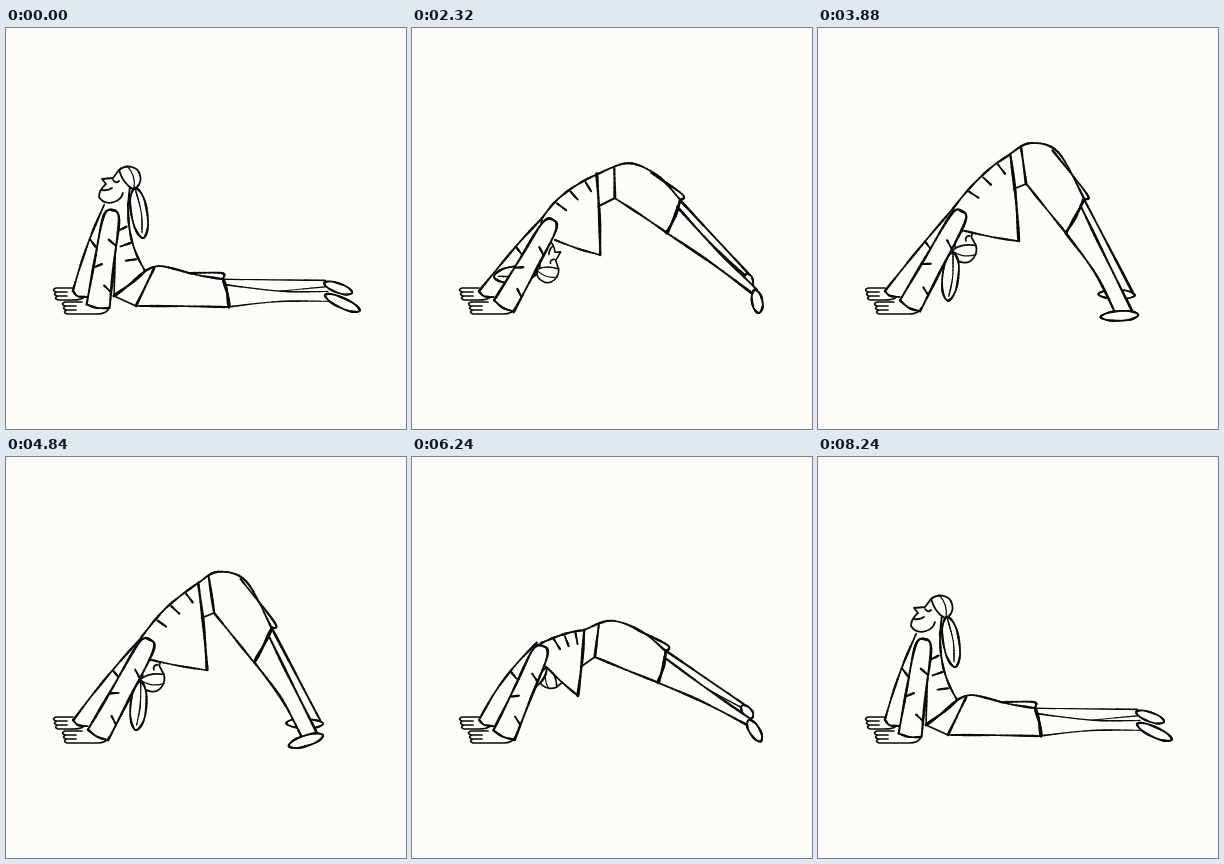
These frames come from a looping animation (400x401 px, 8320 ms). An HTML page with a canvas:

```html
<!DOCTYPE html>
<html lang="en">
<head>
<meta charset="utf-8">
<title>Yoga flow</title>
<style>
  html, body { margin: 0; width: 100%; height: 100%; overflow: hidden; background: #fdfcf8; }
  canvas { display: block; width: 400px; height: 401px; }
</style>
</head>
<body>
<canvas id="stage"></canvas>
<script>
const LOOP = 8320, PAPER = '#fdfcf8', INK = '#0b0b0b';
const FAR_WRIST = [67, 263], NEAR_WRIST = [92, 278];

// Joints of each pose; plain numbers are bends, widths and angles
const cobra = {
  shoulder: [105, 190], farShoulder: [98, 177], nape: [122, 177], armBow: 2, backBow: 5,
  hemTop: [139, 243], hemBottom: [108, 268], rump: [155, 238], seat: [190, 247],
  hemBack: [217, 251], hemFront: [223, 279], lap: 1, crotch: [130, 278],
  knee: [275, 263], heel: [319, 267], toe: [354, 283], farHeel: [318, 255], farToe: [346, 265],
  sole: 0.1, ankle: 5, legInk: 1.4,
  head: [124, 150], turn: 0, size: 1, ponyTip: [137, 210]
};
const lookUp = {
  ...cobra, farShoulder: [112, 173], nape: [127, 177], armBow: 13,
  head: [141, 156], turn: 12, ponyTip: [150, 213]
};
const rise = {
  shoulder: [137, 199], farShoulder: [130, 190], nape: [130, 190], armBow: 1, backBow: -5,
  hemTop: [185, 146], hemBottom: [188, 227], rump: [216, 135], seat: [245, 147],
  hemBack: [268, 172], hemFront: [255, 205], lap: 0.4, crotch: [203, 170],
  knee: [303, 220], heel: [343, 262], toe: [347, 285], farHeel: [335, 246], farToe: [338, 260],
  sole: 0.1, ankle: 3, legInk: 2.3,
  head: [135, 245], turn: -235, size: 0.9, ponyTip: [82, 249]
};
const dog = {
  ...rise, shoulder: [140, 190], farShoulder: [135, 181], nape: [135, 181], backBow: -4,
  hemTop: [192, 126], hemBottom: [201, 213], rump: [212, 115], seat: [240, 124],
  hemBack: [266, 171], hemFront: [248, 205], crotch: [208, 156],
  knee: [283, 220], heel: [321, 288], toe: [283, 289], farHeel: [317, 267], farToe: [280, 266],
  sole: 0.35, ankle: 8, head: [146, 224], turn: -245, size: 1, ponyTip: [130, 273]
};
const stepOut = {
  ...dog, shoulder: [134, 198], farShoulder: [122, 193], nape: [122, 193], backBow: -2,
  hemTop: [188, 122], hemBottom: [191, 231], rump: [206, 115], seat: [236, 122],
  hemBack: [270, 168], hemFront: [241, 211], crotch: [204, 150],
  knee: [268, 214], heel: [323, 262], toe: [292, 270], farHeel: [338, 243], farToe: [339, 265],
  sole: 0.2, ankle: 6, legInk: 1.8, head: [147, 226], ponyTip: [127, 271]
};

// The feet wait on the spot while the hips go up
const OPENING = [[cobra, 0], [lookUp, 1080], [lookUp, 1560], [rise, 2320]];
const CLOSING = [[dog, 3280], [dog, 5160], [stepOut, 5680], [rise, 6040],
  [lookUp, 6760], [lookUp, 7000], [cobra, 8240], [cobra, LOOP]];
const BODY = [...OPENING, [stepOut, 2480], ...CLOSING];
const LEGS = [...OPENING, [rise, 2560], [stepOut, 2840], ...CLOSING];
const LEG_JOINTS = ['knee', 'heel', 'toe', 'farHeel', 'farToe', 'sole', 'ankle'];

// Each run of drawings: first change, last change, number of changes
const RUNS = [
  [120, 840, 7], [960, 1520, 6], [1680, 2480, 11], [2560, 3320, 10], [3440, 4240, 8],
  [4360, 5160, 8], [5240, 6040, 11], [6160, 6720, 8], [6880, 7680, 8], [7800, 8240, 5]
];
const TICKS = [0, ...RUNS.flatMap(([from, to, n]) =>
  Array.from({ length: n }, (_, i) => Math.round((from + (to - from) * i / (n - 1)) / 40) * 40))];

const lerp = (a, b, u) => Array.isArray(a) ? a.map((v, i) => v + (b[i] - v) * u) : a + (b - a) * u;
const move = (p, dir, by) => p.map((v, i) => v + dir[i] * by);
const unit = (a, b) => {
  const [x, y] = [b[0] - a[0], b[1] - a[1]], d = Math.hypot(x, y) || 1;
  return [x / d, y / d];
};
const normal = (a, b) => { const [x, y] = unit(a, b); return [-y, x]; };
const bent = (a, b, u, bow) => move(lerp(a, b, u), normal(a, b), bow * 4 * u * (1 - u));

let seed = 0;
function random() {
  const x = Math.sin(++seed * 12.9898) * 43758.5453;
  return x - Math.floor(x);
}

function sample(keys, t) {
  const k = Math.max(0, keys.findIndex(key => key[1] > t) - 1);
  const [a, t0] = keys[k], [b, t1] = keys[k + 1], pose = {};
  for (const name in a) pose[name] = lerp(a[name], b[name], (t - t0) / (t1 - t0));
  return pose;
}

function poseAt(t) {
  const pose = sample(BODY, t), legs = sample(LEGS, t);
  for (const name of LEG_JOINTS) pose[name] = legs[name];
  // Pedal the heels in turn
  if (t > 3280 && t < 5160) {
    const lift = Math.sin((t - 3280) / 627 * Math.PI);
    pose.heel = move(pose.heel, [-4, -10], Math.max(0, lift));
    pose.farHeel = move(pose.farHeel, [-3, -7], Math.max(0, -lift));
  }
  return pose;
}

const canvas = document.getElementById('stage');
const ctx = canvas.getContext('2d');
const ratio = window.devicePixelRatio || 1;
canvas.width = 400 * ratio;
canvas.height = 401 * ratio;
ctx.lineCap = ctx.lineJoin = 'round';

// Smooth curve through slightly shaken points
function spline(points, closed) {
  const pts = points.map(p => p.map(v => v + (random() - 0.5) * 0.6)), n = pts.length, out = [];
  const at = i => closed ? pts[(i + n) % n] : pts[Math.max(0, Math.min(n - 1, i))];
  const end = closed ? n : n - 1;
  for (let i = 0; i < end; i++) {
    const [p, a, b, q] = [at(i - 1), at(i), at(i + 1), at(i + 2)];
    for (let u = 0; u < 1; u += 1 / 8)
      out.push(a.map((v, k) => v + 0.5 * u * (b[k] - p[k]
        + u * (2 * p[k] - 5 * v + 4 * b[k] - q[k] + u * (3 * (v - b[k]) + q[k] - p[k])))));
  }
  out.push(at(end));
  return out;
}

function mask(points) {
  ctx.beginPath();
  points.forEach(p => ctx.lineTo(...p));
  ctx.fillStyle = PAPER;
  ctx.fill();
}

// Pen line whose pressure swells and fades
function pen(points, width) {
  const phase = random() * 6;
  ctx.strokeStyle = INK;
  for (let i = 1; i < points.length; i++) {
    ctx.lineWidth = width * (1 + 0.18 * Math.sin(i * 0.7 + phase));
    ctx.beginPath();
    ctx.moveTo(...points[i - 1]);
    ctx.lineTo(...points[i]);
    ctx.stroke();
  }
}

const curve = (points, width) => pen(spline(points), width);

function shape(points, width, closed) {
  const outline = spline(points, closed);
  mask(outline);
  pen(outline, width);
}

// Long rounded form, used for feet and hair
function leaf(a, b, r, width) {
  const side = s => [0.25, 0.75].map(u => move(lerp(a, b, u), normal(a, b), s * r));
  shape([a, ...side(1), b, ...side(-1).reverse()], width, true);
}

function hand(x, y, end) {
  ctx.beginPath();
  for (let i = 0; i < 3; i++) {
    const tip = x + 3 + i, top = y + i * 4;
    ctx.moveTo(x + (i ? 14 : 20), top);
    ctx.lineTo(tip, top);
    ctx.quadraticCurveTo(tip - 5, top + 2, tip, top + 4);
  }
  ctx.lineTo(end[0] - 12, y + 12);
  ctx.quadraticCurveTo(end[0] - 2, y + 12, ...end);
  ctx.strokeStyle = INK;
  ctx.lineWidth = 1.7;
  ctx.stroke();
}

const FACE = new Path2D('M-11-8L-17 0L-28 1L-24 6Q-31 12-31 19Q-26 27-16 24Q-9 22-7 15M-17 2Q-14 6-11 3M-28 12Q-22 13-18 10');
const CAP = new Path2D('M-11-8C-4-14 8-12 10-3C12 4 8 10 3 11C-3 8-8 2-11-8Z');
const BAND = new Path2D('M-3-12Q6-3 4 10');

function headAndHair(p) {
  ctx.save();
  ctx.translate(...p.head);
  ctx.rotate(p.turn * Math.PI / 180);
  ctx.scale(p.size, p.size);
  ctx.strokeStyle = INK;
  ctx.lineWidth = 1.8;
  ctx.stroke(FACE);
  ctx.fillStyle = PAPER;
  ctx.fill(CAP);
  ctx.stroke(CAP);
  ctx.lineWidth = 1.2;
  ctx.stroke(BAND);
  ctx.restore();

  const a = p.turn * Math.PI / 180, down = [-Math.sin(a), Math.cos(a)], side = [Math.cos(a), Math.sin(a)];
  const nape = move(p.head, down, 10 * p.size), root = move(nape, side, 5 * p.size);
  curve([nape, lerp(nape, p.nape, 0.5), p.nape], 1.8);
  leaf(root, p.ponyTip, 7, 2);
  curve([root, bent(root, p.ponyTip, 0.5, -2), lerp(root, p.ponyTip, 0.9)], 1.3);
}

function legs(p) {
  const near = lerp(p.heel, p.toe, p.sole), far = lerp(p.farHeel, p.farToe, p.sole / 2);
  const across = normal(p.hemFront, near);
  const up = unit(p.hemFront, p.hemBack), corner = move(p.hemBack, up, 6);

  curve([lerp(p.rump, p.seat, 0.8), corner, p.hemBack], 2);
  curve([p.hemBack, move(far, across, -p.ankle * 0.6)], p.legInk);
  curve([p.knee, move(far, across, p.ankle * 0.6)], p.legInk * 0.8);
  leaf(p.farHeel, p.farToe, 4, 1.8);

  const back = spline([lerp(p.hemBack, p.hemFront, 0.2), p.knee, move(near, across, -p.ankle)]);
  const front = spline([p.hemFront, lerp(p.hemFront, near, 0.5), move(near, across, p.ankle)]);
  mask([...back, ...front.slice().reverse()]);
  pen(back, p.legInk);
  pen(front, p.legInk);
  leaf(p.heel, p.toe, 4.5, 2);
}

function torso(p) {
  const back = [0, 0.25, 0.5, 0.75, 1].map(u => bent(p.nape, p.hemTop, u, p.backBow));
  const chest = move(p.shoulder, [6, 13], 1);
  mask([...back, p.hemBottom, chest]);
  curve(back, 2);
  curve([chest, bent(chest, p.hemBottom, 0.5, 1), p.hemBottom], 1.8);

  const along = unit(p.nape, p.hemTop), inward = normal(p.nape, p.hemTop);
  for (const u of [0.3, 0.55, 0.8]) {
    const start = move(bent(p.nape, p.hemTop, u, p.backBow), inward, 2);
    curve([start, move(move(start, inward, 11), along, 5 - 8 * u)], 1.9);
  }

  curve([p.hemTop, p.rump, p.seat, p.hemBack], 2);
  const lap = lerp(p.hemTop, p.hemBottom, p.lap);
  pen([lap, p.crotch, ...spline([p.crotch, lerp(p.crotch, p.hemFront, 0.5), p.hemFront])], 2);
  curve([lerp(p.hemTop, p.rump, 0.55), p.crotch], 2.4);
  curve([p.hemTop, bent(p.hemTop, p.hemBottom, 0.5, -1), p.hemBottom], 2.7);
  curve([p.hemBack, bent(p.hemBack, p.hemFront, 0.5, -1), p.hemFront], 3);
}

function farArm(p) {
  const at = u => bent(p.farShoulder, FAR_WRIST, u, p.armBow);
  curve([0, 0.33, 0.66, 1].map(at), 2);
  curve([FAR_WRIST, [72, 268], [82, 269]], 1.9);
  const start = at(0.4);
  curve([start, move(start, [6, 8], 1)], 1.9);
  hand(47, 260, [78, 269]);
}

function nearArm(p) {
  const s = p.shoulder, along = unit(s, NEAR_WRIST), across = normal(s, NEAR_WRIST);
  const edge = (u, side) => move(lerp(s, NEAR_WRIST, u), across, side * (8 + 3.5 * u));
  shape([edge(1, 1), edge(0.5, 1), edge(0, 1), move(s, along, -8),
    edge(0, -1), edge(0.5, -1), edge(1, -1)], 2.3);
  curve([edge(1, 1), move(NEAR_WRIST, along, 2), edge(1, -1)], 2);
  [0.3, 0.58, 0.82].forEach((u, i) => {
    const side = i % 2 ? 1 : -1, start = edge(u, side);
    curve([start, move(move(start, across, -side * 8), along, -5)], 1.9);
  });
  hand(56, 274, [103, 280]);
}

function draw(tick) {
  const p = poseAt(TICKS[tick]);
  seed = (tick % (TICKS.length - 1)) * 997;
  ctx.setTransform(ratio, 0, 0, ratio, 0, 0);
  ctx.fillStyle = PAPER;
  ctx.fillRect(0, 0, 400, 401);
  for (const part of [farArm, legs, headAndHair, torso, nearArm]) part(p);
}

const start = performance.now();
let shown = -1;
function loop() {
  const t = (performance.now() - start) % LOOP;
  let tick = TICKS.length - 1;
  while (TICKS[tick] > t) tick--;
  if (tick !== shown) draw(shown = tick);
  requestAnimationFrame(loop);
}
loop();
</script>
</body>
</html>
```
